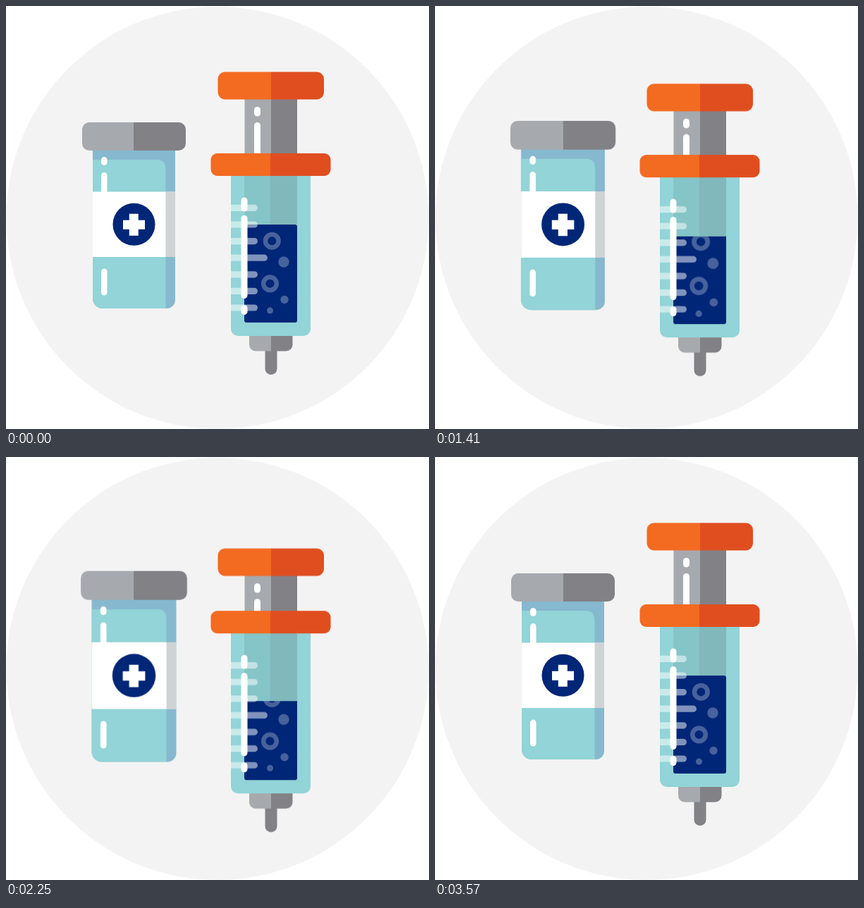
Recreate the animation shown at these times as an HTML page. Size 600 by 600 pixels, loop 3600 ms.

```html
<!DOCTYPE html>
<html lang="en">
<head>
<meta charset="utf-8">
<title>Vial and syringe</title>
<style>
  html, body { margin: 0; width: 100%; height: 100%; overflow: hidden; background: #fff; }
  svg { display: block; width: 100vw; height: 100vh; }

  .vial { transform-origin: 181.5px 297px; animation: pulse 1.8s cubic-bezier(.667, 0, .333, 1) infinite; }
  .syringe { animation: sink 3.6s infinite; }
  .plunger { animation: press 3.6s infinite; }
  .bubbles { transform-origin: 384px 363px; animation: swell 3.6s infinite; }
  .syringe, .plunger, .bubbles { animation-timing-function: cubic-bezier(.333, 0, .667, 1); }

  @keyframes pulse {
    0%, 100% { transform: scale(1); }
    50% { transform: scale(1.05); }
  }
  @keyframes sink {
    0%, 26.11% { transform: translateY(0); }
    70% { transform: translateY(10px); }
    75.83% { transform: translateY(10px); animation-timing-function: cubic-bezier(.42, 0, .5, 1); }
    95%, 100% { transform: translateY(0); }
  }
  @keyframes press {
    0%, 23.33% { transform: translateY(0); }
    53.33% { transform: translateY(27px); }
    75.83% { transform: translateY(27px); animation-timing-function: cubic-bezier(.42, 0, .5, 1); }
    95%, 100% { transform: translateY(0); }
  }
  @keyframes swell {
    0%, 15%, 60%, 62.5%, 97.5%, 100% { transform: scale(1); }
    31.67%, 80% { transform: scale(1.04); }
  }
</style>
</head>
<body>
<svg viewBox="0 0 600 600">
  <defs>
    <linearGradient id="gray">
      <stop offset=".5" stop-color="#a6a9ae"/><stop offset=".5" stop-color="#828185"/>
    </linearGradient>
    <linearGradient id="orange">
      <stop offset=".5" stop-color="#f36a21"/><stop offset=".5" stop-color="#e04e20"/>
    </linearGradient>
    <linearGradient id="inner">
      <stop offset=".5" stop-color="#85c4c7"/><stop offset=".5" stop-color="#80b8bc"/>
    </linearGradient>
  </defs>

  <circle cx="300" cy="300.5" r="299.5" fill="#f3f3f3"/>

  <g class="vial">
    <path d="M123 203H240V417a12 12 0 0 1-12 12H137a14 14 0 0 1-14-14Z" fill="#86b8cf"/>
    <path d="M123 218H214q12.500 0 12.500 14V429H137a14 14 0 0 1-14-14Z" fill="#92d4d7"/>
    <path d="M123 263.500H240V356H123Z" fill="#fff"/>
    <path d="M226.500 263.500H240V356H226.500Z" fill="#d0d3d3"/>
    <circle cx="181.500" cy="309.700" r="30" fill="#002677"/>
    <path d="M166 310.200H197M181.300 294.700V325.700" stroke="#fff" stroke-width="13"/>
    <g fill="#fff">
      <rect x="135" y="214" width="8.500" height="12" rx="4.250"/>
      <path d="M135 264V240.250a4.250 4.250 0 0 1 8.500 0V264Z"/>
      <rect x="135" y="372.500" width="8.500" height="38" rx="4.250"/>
    </g>
    <rect x="108" y="165" width="147" height="40" rx="10" fill="url(#gray)"/>
  </g>

  <g class="syringe">
    <path d="M367.500 488H384.500V514.500a8.500 8.500 0 0 1-17 0Z" fill="#828185"/>
    <path d="M345 466H406.500V480.500a9 9 0 0 1-9 9H354a9 9 0 0 1-9-9Z" fill="url(#gray)"/>
    <path d="M319 235H432V458a10 10 0 0 1-10 10H329a10 10 0 0 1-10-10Z" fill="#92d4d7"/>
    <rect x="338" y="300" width="75" height="10" fill="url(#inner)"/>
    <rect x="338" y="310" width="75" height="139" rx="3" fill="#002677"/>

    <g class="bubbles" fill="#fff" stroke="#fff" stroke-width="0" opacity=".28">
      <g fill="none" stroke-width="6.500">
        <circle cx="377.300" cy="333.200" r="9.300"/>
        <circle cx="374.500" cy="393.800" r="9.300"/>
      </g>
      <circle cx="394" cy="363" r="7.700"/>
      <circle cx="395" cy="416.500" r="5.700"/>
      <circle cx="374.500" cy="432" r="4.500"/>
    </g>

    <g class="plunger">
      <rect x="338" y="212" width="75" height="98" fill="url(#inner)"/>
      <rect x="338.500" y="130" width="74.500" height="82" fill="url(#gray)"/>
      <g fill="#fff">
        <rect x="352" y="143" width="9" height="13.500" rx="4.500"/>
        <path d="M352 212V169.500a4.500 4.500 0 0 1 9 0V212Z"/>
      </g>
      <rect x="300.500" y="93.500" width="150.500" height="39" rx="10" fill="url(#orange)"/>
    </g>

    <g id="ticks" fill="#fff" opacity=".5"></g>

    <g fill="#fff">
      <rect x="333.500" y="271.500" width="9" height="20" rx="4.500"/>
      <rect x="333.500" y="297" width="9" height="118" rx="4.500"/>
      <rect x="333.500" y="424" width="9" height="14" rx="4.500"/>
    </g>
    <rect x="290.500" y="209" width="170" height="32" rx="9" fill="url(#orange)"/>
  </g>
</svg>
<script>
  const tick = i => {
    const end = i === 3 ? 371 : 357;
    return `<path d="M319 ${281.8 + i * 23.6}H${end - 4.6}a4.6 4.6 0 0 1 0 9.2H319Z"/>`;
  };
  document.getElementById('ticks').innerHTML = [...Array(7).keys()].map(tick).join('');
</script>
</body>
</html>
```
